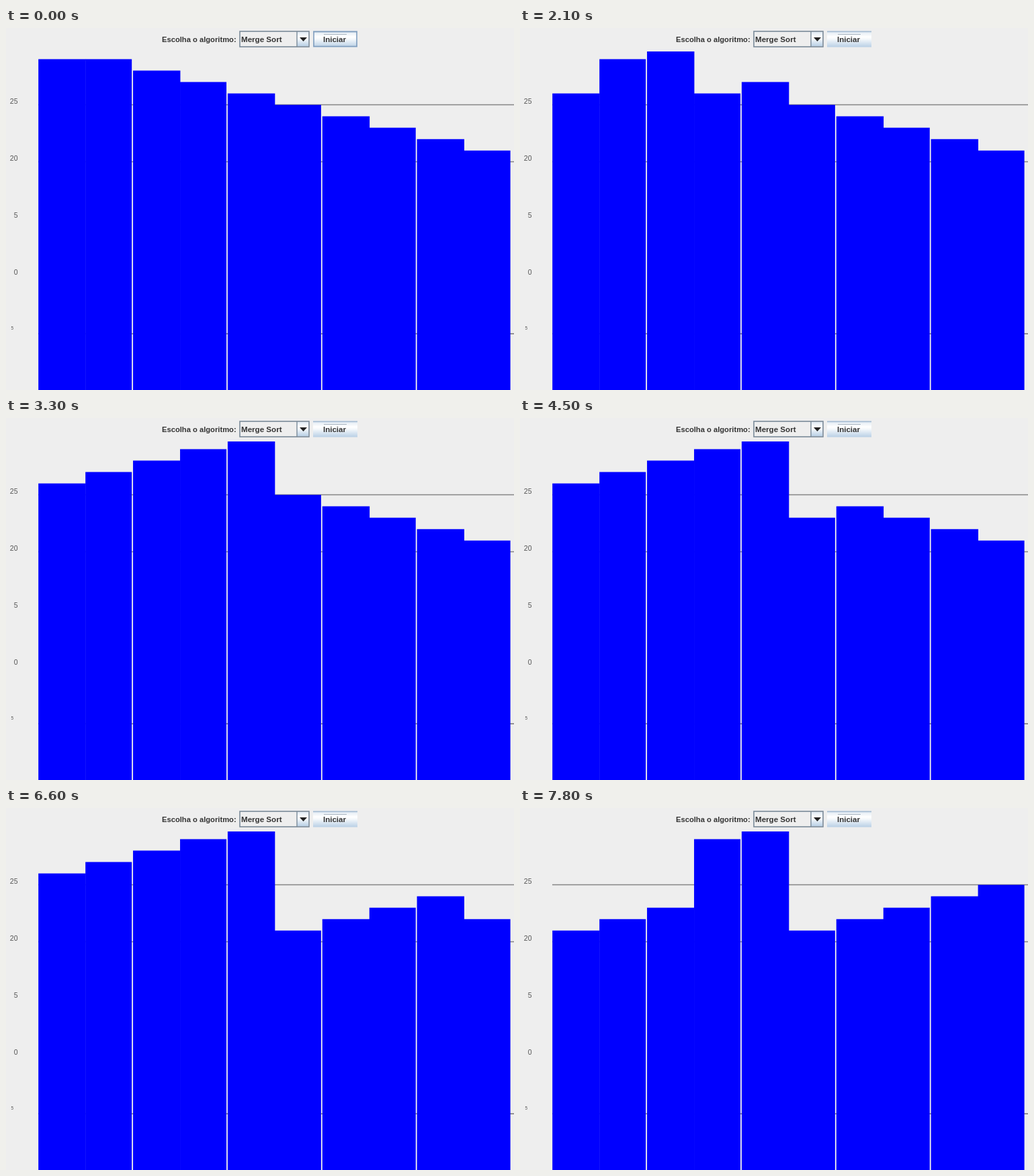
Recreate the animation shown at these times as an HTML page. Size 756 by 540 pixels, loop 8 s.

```html
<!DOCTYPE html>
<html lang="pt">
<head>
<meta charset="utf-8">
<title>Merge Sort</title>
<style>
  html, body { margin: 0; width: 100%; height: 100%; overflow: hidden; background: #eee; }
  svg { display: block; width: 756px; height: 540px; }
  text { font: bold 11.6px "Liberation Sans", Arial, sans-serif; fill: #333; }
  .axis text { font-weight: normal; font-size: 10.5px; fill: #555; text-anchor: end; }
</style>
</head>
<body>
<svg viewBox="0 0 756 540">
  <defs>
    <linearGradient id="metal" x2="0" y2="1">
      <stop offset="0" stop-color="#dfe9f2"/>
      <stop offset=".35" stop-color="#fff"/>
      <stop offset=".5" stop-color="#f4f8fb"/>
      <stop offset="1" stop-color="#b8cfe5"/>
    </linearGradient>
  </defs>

  <text x="232" y="21" style="font-size:11.2px">Escolha o algoritmo:</text>

  <rect x="348" y="5" width="103" height="23" fill="#eee" stroke="#7a8a99" stroke-width="1.6"/>
  <rect x="433" y="6" width="17" height="21" fill="url(#metal)"/>
  <path d="M433 5V28" stroke="#7a8a99" stroke-width="1.4"/>
  <path d="M437 14h11l-5.5 6z" fill="#222"/>
  <text x="350" y="20.5">Merge Sort</text>

  <rect x="457" y="5" width="66" height="23.5" fill="url(#metal)"/>
  <path d="M457 5.3H523" stroke="#a6bdd4" stroke-width="1.8"/>
  <path d="M473 9.5H507" stroke="#a9b4bf"/>
  <rect id="hover" x="458" y="5.5" width="64" height="22" fill="none" stroke="#7f9dbd" stroke-width="1.6"/>
  <text x="472" y="21" style="font-size:11.5px">Iniciar</text>

  <path d="M48 114.5H756M48 199.5H756M48 456.2H756" stroke="#858585" stroke-width="1.7"/>
  <g class="axis">
    <text x="17.5" y="112.5">25</text>
    <text x="17.5" y="197.5">20</text>
    <text x="17.5" y="282.5">5</text>
    <text x="17.5" y="367.5">0</text>
    <text x="11" y="450" style="font-size:6.5px">5</text>
  </g>
  <g id="bars" fill="#00f"></g>
</svg>
<script>
const STEP = 300, LOOP = 8000, COUNT = 10;
const group = document.getElementById('bars');
const hover = document.getElementById('hover');

// Bars stand in touching pairs; the left one overlaps its partner to hide the seam.
const bars = Array.from({ length: COUNT }, (_, i) => {
  const bar = document.createElementNS('http://www.w3.org/2000/svg', 'rect');
  const odd = i % 2;
  bar.setAttribute('x', 48.2 + 140.85 * (i >> 1) + 70 * odd);
  bar.setAttribute('width', odd ? 69 : 70.4);
  return group.appendChild(bar);
});

// Every single write of a top-down merge sort becomes one state.
const values = Array.from({ length: COUNT }, (_, i) => 30 - i);
const states = [];

function sort(lo, hi) {
  if (lo >= hi) return;
  const mid = (lo + hi) >> 1;
  sort(lo, mid);
  sort(mid + 1, hi);
  const copy = values.slice();
  let a = lo, b = mid + 1;
  for (let k = lo; k <= hi; k++) {
    const takeLeft = b > hi || (a <= mid && copy[a] <= copy[b]);
    values[k] = takeLeft ? copy[a++] : copy[b++];
    states.push(values.slice());
  }
}
sort(0, COUNT - 1);

// The tallest bar is cut off by the top of the chart panel.
const barTop = v => Math.max(35, 182.8 - 17.04 * (v - 21));

function draw(time) {
  const step = Math.floor(time % LOOP / STEP);
  states[step].forEach((v, i) => {
    bars[i].setAttribute('y', barTop(v));
    bars[i].setAttribute('height', 540 - barTop(v));
  });
  hover.style.display = step < 2 ? '' : 'none';
}

let start;
function tick(now) {
  start ??= now;
  draw(now - start);
  requestAnimationFrame(tick);
}
draw(0);
requestAnimationFrame(tick);
</script>
</body>
</html>
```
